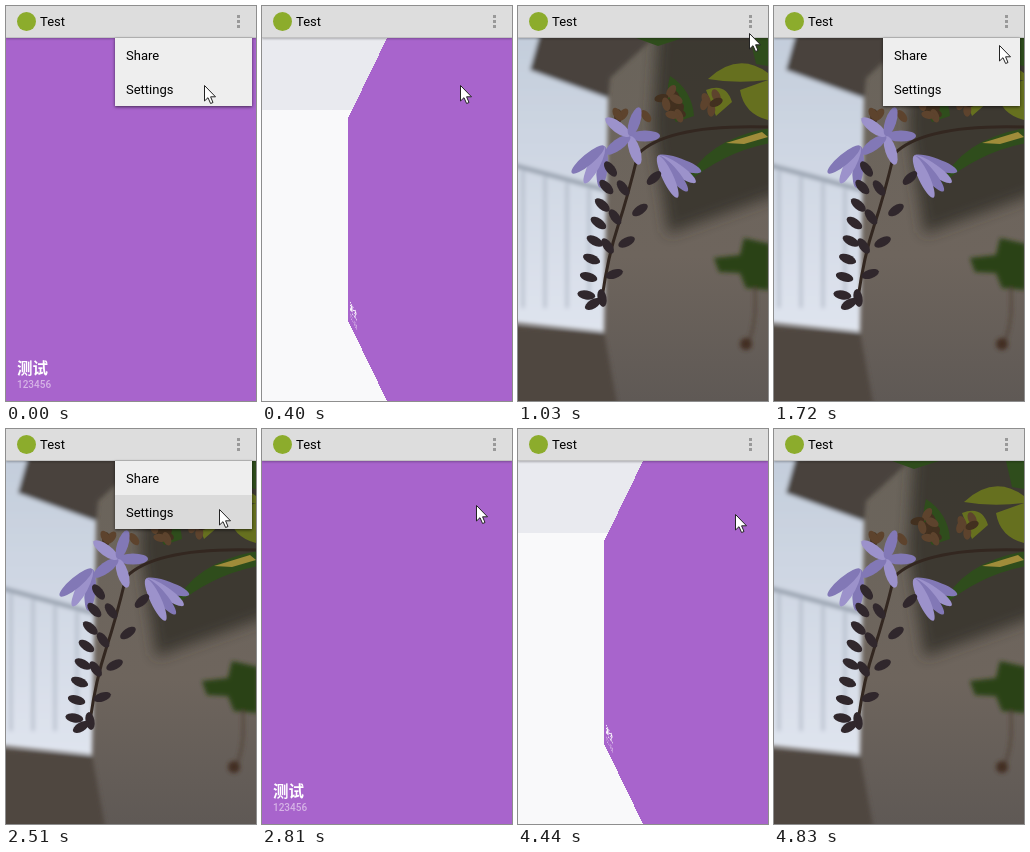
An HTML page that plays this animation: 250 by 395 pixels, repeating every 5.18 s.

```html
<!DOCTYPE html>
<html lang="en">
<head>
<meta charset="utf-8">
<title>Card flip</title>
<style>
html, body { margin: 0; width: 250px; height: 395px; overflow: hidden; }
body { position: relative; font: 13px/16px Roboto, sans-serif; color: #000; background: #f9f9fa; }
body > *, #bar > *, .face, .face > * { position: absolute; }
#stage {
  left: 0; top: 32px; width: 250px; height: 363px; overflow: hidden;
  perspective: 131px; background: linear-gradient(#e9eaef 72px, #f9f9fa 72px);
}
.face { left: 0; top: 0; width: 250px; height: 363px; overflow: hidden; }
#card { background: #a864cc; color: #fff; }
#card b { left: 11px; top: 319px; font: bold 15.5px/20px "Noto Sans CJK SC", "Noto Sans CJK", sans-serif; }
#card span { left: 11px; top: 338.5px; font-size: 10px; font-weight: 500; color: #d6b3e6; }
#bar {
  left: 0; top: 0; width: 250px; height: 31px; background: #ddd;
  border-bottom: 1px solid #c2c2c2; box-shadow: 0 1px 2px #0004;
}
#icon { left: 11px; top: 6px; width: 19px; height: 19px; border-radius: 50%; background: #8cac2c; }
#title { left: 34px; top: 8px; }
#dots { left: 231px; top: 9px; width: 3px; height: 3px; background: #999; box-shadow: 0 5px #999, 0 10px #999; }
#menu { left: 109px; top: 32px; width: 137px; height: 68px; background: #eee; box-shadow: 0 1px 3px #0009; }
#menu div { height: 34px; line-height: 35px; padding-left: 11px; }
#cursor { left: 0; top: 0; overflow: visible; }
</style>
</head>
<body>
<div id="stage">
  <svg class="face" id="photo" viewBox="0 32 250 363">
    <defs>
      <linearGradient id="wall" x2="0" y2="1">
        <stop stop-color="#6a645b"/><stop offset=".6" stop-color="#6e655d"/><stop offset="1" stop-color="#5f5955"/>
      </linearGradient>
      <linearGradient id="sky" x2="0" y2="1">
        <stop stop-color="#c3cddb"/><stop offset="1" stop-color="#dfe4ee"/>
      </linearGradient>
      <filter id="soft"><feGaussianBlur stdDeviation="2"/></filter>
      <filter id="haze" x="-.5" y="-.5" width="2" height="2"><feGaussianBlur stdDeviation="7"/></filter>
    </defs>
    <path fill="url(#wall)" d="M0 32H250V395H0Z"/>
    <path fill="#36322b" filter="url(#haze)" d="M140 20H270V185L150 228 134 120Z" opacity=".85"/>
    <g filter="url(#soft)">
      <path fill="url(#sky)" d="M-9 22H26L90 88 86 326-9 316Z"/>
      <path fill="#48433c" d="M22 28H140L92 72 90 92 12 64Z"/>
      <path fill="#50463f" d="M-9 320 86 327 100 402H-9Z"/>
      <path id="rails" fill="none" stroke="#aeb7c5" stroke-width="2.5"/>
      <path fill="none" stroke="#8e98a6" stroke-width="4" d="M-5 159 88 184"/>
      <path fill="#2c4219" d="M196 252 222 249 226 232 252 238V284L228 282 222 267 201 266Z"/>
      <path fill="none" stroke="#4d3c30" stroke-width="2" d="M237 280Q239 320 230 336"/>
      <circle cx="228" cy="338" r="6" fill="#432d22"/>
    </g>
    <path fill="#2f4d1c" d="M118 32H165L140 40ZM168 178Q186 134 252 122V137Q205 146 168 178ZM152 70Q174 84 176 110L158 116Q145 95 152 70ZM232 32H250V60L238 58Z"/>
    <path fill="#66701f" d="M190 73Q220 45 250 67V74Q218 78 190 73ZM222 84 250 74V114Q226 108 222 84ZM188 84Q208 76 214 96L198 110Z"/>
    <path fill="#a08c3a" d="M208 137 244 126 250 131 226 138Z"/>
    <path fill="none" stroke="#332720" stroke-width="3" d="M120 148Q150 118 250 121M120 148Q110 190 100 220T84 292"/>
    <g id="plant"></g>
  </svg>
  <div class="face" id="card"><b lang="zh">测试</b><span>123456</span></div>
</div>
<div id="bar"><i id="icon"></i><span id="title">Test</span><i id="dots"></i></div>
<div id="menu"><div>Share</div><div id="settings">Settings</div></div>
<svg id="cursor" width="13" height="20">
  <path fill="#fff" stroke="#222" d="M.5.5V16L4 12.7 6.6 18.5 9 17.5 6.6 11.8H11.5Z"/>
</svg>
<script>
const $ = id => document.getElementById(id);
const LOOP = 5180, FIRST = 215, TICK = 135;

// tick, x, y of the pointer tip
const path = [[0, 198, 79], [3, 198, 79], [7, 231, 27], [10, 232, 13], [11, 231, 20], [14, 213, 76],
  [15, 213, 80], [19, 213, 80], [20, 214, 76], [24, 228, 19], [26, 228, 13], [28, 217, 85], [99, 217, 85]];
// start and length in ticks
const flips = [[.85, 3.05], [18.5, 1.2], [30.85, 3.05]];

let seed = 7;
const random = () => (seed = seed * 16807 % 2147483647) / 2147483647;
const oval = (x, y, rx, ry, angle, fill) =>
  `<ellipse rx="${rx}" ry="${ry}" fill="${fill}" transform="translate(${x} ${y}) rotate(${angle})"/>`;
const repeat = (count, make) => Array.from({ length: count }, (_, i) => make(i)).join('');

// Petals fan out from one point between two angles.
const flower = (x, y, length, from, to, count) => repeat(count, i => {
  const angle = from + (to - from) * i / (count - 1), a = angle * Math.PI / 180;
  return oval(x + Math.cos(a) * length / 2, y + Math.sin(a) * length / 2,
    length / 2, 5.5, angle, i % 2 ? '#9c92cb' : '#8278b6');
});

const husks = (x, y, spread, count) => repeat(count, () => oval(x + (random() - .5) * spread,
  y + (random() - .5) * spread * .8, 7, 4, random() * 180, random() < .5 ? '#5d432d' : '#42301f'));

const stemX = y => 84 + 36 * Math.max(0, (292 - y) / 144) ** 1.2;
const bud = (y, offset, angle) => oval(stemX(y) + offset, y, 9, 4.5, angle, '#30272c');

function drawPlant() {
  $('rails').setAttribute('d', repeat(4, i => `M${5 + 22 * i} ${165 + 6 * i}V302`));
  $('plant').innerHTML = husks(146, 98, 36, 12) + husks(190, 97, 20, 5) + husks(98, 110, 16, 3)
    + flower(86, 140, 42, 95, 140, 3) + flower(140, 150, 46, 20, 65, 4) + flower(112, 130, 30, 0, 288, 5)
    + repeat(8, i => bud(163 + 18 * i, -23 + i, 52 - 6 * i))
    + repeat(4, i => bud(172 + 32 * i, 23 - 5 * i, -42 + 8 * i))
    + repeat(3, i => bud(182 + 29 * i, -5, 55)) + bud(292, 0, 80) + bud(298, -9, -30);
}

function pointer(n) {
  const i = path.findIndex(p => p[0] > n);
  const [n0, x0, y0] = path[i - 1], [n1, x1, y1] = path[i];
  const k = (n - n0) / (n1 - n0);
  return [x0 + (x1 - x0) * k, y0 + (y1 - y0) * k].map(Math.round);
}

function turn(n) {
  return flips.reduce((sum, [start, length]) => {
    const u = Math.min(1, Math.max(0, (n - start) / length));
    return sum + 90 * (1 - Math.cos(Math.PI * u));
  }, 0);
}

function show(face, angle) {
  const a = ((angle + 180) % 360 + 360) % 360 - 180;
  face.style.visibility = Math.abs(a) < 90 ? 'visible' : 'hidden';
  face.style.transform = Math.abs(a) < .01 ? 'none' : `rotateY(${a}deg)`;
}

const menuOpen = n => n < 1 || n >= 11 && n < 19 || n >= 27 && n < 31;

// The screen refreshes in coarse ticks, so every pose follows the tick count.
function draw(now) {
  const n = Math.max(0, Math.floor((now % LOOP - FIRST) / TICK) + 1);
  const angle = turn(n);
  show($('card'), -angle);
  show($('photo'), 180 - angle);
  $('menu').style.visibility = menuOpen(n) ? 'visible' : 'hidden';
  $('settings').style.background = n === 18 ? '#dadada' : '';
  const [x, y] = pointer(n);
  $('cursor').style.transform = `translate(${x}px, ${y}px)`;
  $('cursor').style.visibility = n < 35 ? 'visible' : 'hidden';
  requestAnimationFrame(draw);
}

drawPlant();
draw(0);
</script>
</body>
</html>
```
